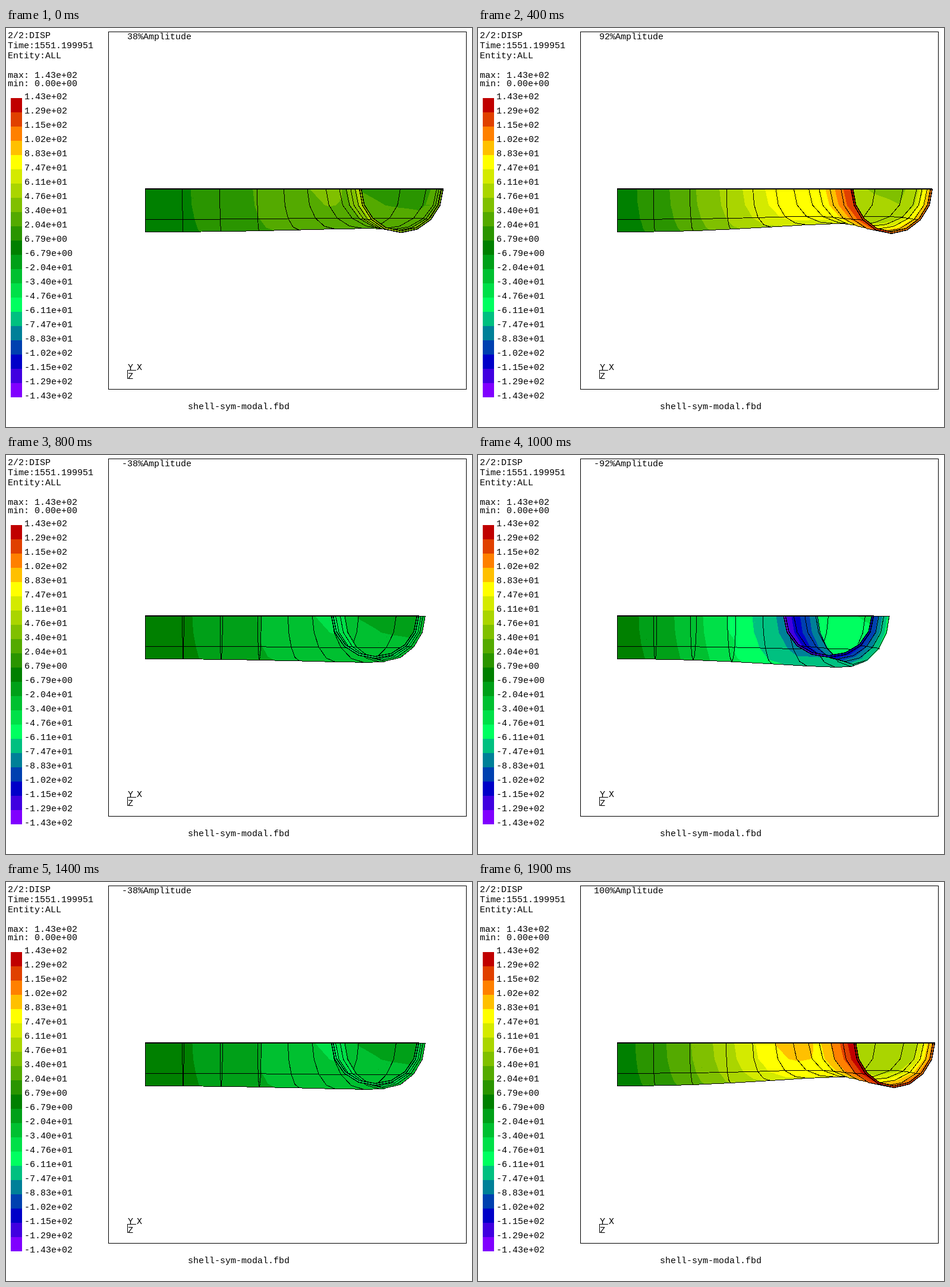
These frames come from a looping animation (784x672 px, 2 s). An HTML page:

```html
<!DOCTYPE html>
<html lang="en">
<head>
<meta charset="utf-8">
<title>Mode shape</title>
<style>
  html, body { margin: 0; width: 100%; height: 100%; overflow: hidden; background: #fff; }
  svg { display: block; width: 784px; height: 672px; }
  text { font: 15px "Liberation Mono", monospace; white-space: pre; }
  .line { fill: none; stroke: #000; }
</style>
</head>
<body>
<svg viewBox="0 0 784 672" shape-rendering="crispEdges">
  <rect width="784" height="672" fill="#fff"/>
  <g id="legend"></g>
  <g id="mesh"></g>
  <rect class="line" x="172.5" y="6.5" width="602" height="602"/>
  <path class="line" d="M219 576.5H204.5V591"/>
  <text x="3" y="17">2/2:DISP</text>
  <text x="3" y="34">Time:1551.199951</text>
  <text x="3" y="51">Entity:ALL</text>
  <text x="3" y="84">max: 1.43e+02</text>
  <text x="3" y="98">min: 0.00e+00</text>
  <text x="205" y="576">Y</text>
  <text x="220" y="576">X</text>
  <text x="205" y="591">Z</text>
  <text x="306" y="642">shell-sym-modal.fbd</text>
  <text id="label" x="312" y="19" text-anchor="end"></text>
</svg>
<script>
const COLORS = ('c00000 e04000 ff8000 ffc000 ffff00 d4ea00 aad500 80c000 54aa00 2a9500 008000 ' +
  '00a018 00c030 00e048 00ff60 00c080 008098 0040b0 0000c8 4000e0 8000ff').split(' ').map(c => '#' + c);
const BAND = 13.588;
const STEP_MS = 100, LOOP_MS = 2000;

// Pipe: straight run, elbow towards the viewer, straight end
const LEFT = 234, TOP = 271, ELBOW = 426, PITCH = 64;
const BEND = 217, RX = 72, RY = 72.5, WALL = 3;
const LAST = 11, SUB = 2, SIDES = 8, HALF = SIDES / 2;

// Mode shape per station at the inner, lower and outer fibre
const MODE = {
  x: {
    inner: [0, -3, -6, -8.5, -9, -11, -13, -8, 3, 23, 43, 61.5],
    lower: [0, 0, 0, -1, -1, 0, 1, 5, 13, 28, 42, 57],
    outer: [0, 3, 5, 7, 7, 7, 9, 15.5, 25, 35, 44, 53.5]
  },
  value: {
    inner: [0, 13.5, 33, 56, 73, 88.5, 90.7, 89.7, 86, 103, 120, 142],
    lower: [0, 10, 28, 48, 63, 72, 71, 70, 75, 90, 106, 124],
    outer: [0, 13, 31, 52, 60, 53, 51, 50, 60, 76, 93, 111]
  },
  drop: [0, -0.5, -2, -5, -9, -13, -15, -14, -10, -5, 0, 3]
};

const mesh = document.getElementById('mesh');
const label = document.getElementById('label');

function sample(list, s) {
  const i = Math.min(Math.floor(s), LAST - 1);
  return list[i] + (list[i + 1] - list[i]) * (s - i);
}

function around(field, s, angle) {
  const inner = sample(field.inner, s), lower = sample(field.lower, s), outer = sample(field.outer, s);
  const mean = (inner + outer) / 2, oval = (mean - lower) / 2;
  return mean - oval + (inner - outer) / 2 * Math.cos(angle) + oval * Math.cos(2 * angle);
}

function node(s, side, amp, inset = 0) {
  const angle = Math.PI * side / SIDES;
  const reach = (RX - inset) * Math.cos(angle);
  const turn = Math.min(Math.max(s - 3, 0), 5) * Math.PI / 10;
  const x = s <= 3 ? LEFT + PITCH * s : ELBOW + (BEND - reach) * Math.sin(turn);
  const y = TOP + (RY - inset) * Math.sin(angle);
  return {
    x: x + amp * around(MODE.x, s, angle),
    y: y + amp * sample(MODE.drop, s) * Math.sin(angle) ** 3,
    v: Math.abs(amp) * around(MODE.value, s, angle) / BAND
  };
}

const ring = (s, amp, inset) =>
  Array.from({ length: SIDES + 1 }, (_, i) => node(s, i, amp, inset));

const pathOf = pts => 'M' + pts.map(p => p.x.toFixed(1) + ' ' + p.y.toFixed(1)).join('L');
const stroke = (pts, width = 1) => `<path class="line" stroke-width="${width}" d="${pathOf(pts)}"/>`;

// Keep the part of a polygon whose value is at least min
function clip(poly, min) {
  const out = [];
  poly.forEach((p, i) => {
    const q = poly[(i + 1) % poly.length];
    if (p.v >= min) out.push(p);
    if ((p.v >= min) !== (q.v >= min)) {
      const k = (min - p.v) / (q.v - p.v);
      out.push({ x: p.x + (q.x - p.x) * k, y: p.y + (q.y - p.y) * k, v: min });
    }
  });
  return out;
}

function shade(poly, sign) {
  const values = poly.map(p => p.v);
  const lo = Math.max(0, Math.round(Math.min(...values)));
  const hi = Math.min(10, Math.round(Math.max(...values)));
  let out = '';
  for (let n = lo; n <= hi; n++) {
    const part = n === lo ? poly : clip(poly, n - 0.5);
    if (part.length > 2) out += `<path fill="${COLORS[10 - sign * n]}" d="${pathOf(part)}Z"/>`;
  }
  return out;
}

function strip(a, b, sign) {
  let out = '';
  for (let i = a.length - 2; i >= 0; i--) {
    out += shade([a[i], b[i], b[i + 1]], sign) + shade([a[i], b[i + 1], a[i + 1]], sign);
  }
  return out;
}

// One half of a pipe segment: filled bands, then its element edges
function panel(rings, sign) {
  let out = '';
  for (let k = 0; k < SUB; k++) out += strip(rings[k], rings[k + 1], sign);
  out += stroke(rings[0]);
  for (let side = 0; side <= HALF; side += 2) out += stroke(rings.map(r => r[side]));
  return out;
}

function drawMesh(amp) {
  const sign = amp < 0 ? -1 : 1;
  let out = '';
  for (let s = 0; s < LAST; s++) {
    const rings = Array.from({ length: SUB + 1 }, (_, k) => ring(s + k / SUB, amp));
    out += panel(rings.map(r => r.slice(HALF)), sign);
    out += panel(rings.map(r => r.slice(0, HALF + 1)), sign);
  }
  const rim = ring(LAST, amp), bore = ring(LAST, amp, WALL);
  out += strip(rim, bore, sign) + stroke(rim, 1.5) + stroke(bore, 1.5);
  return out + stroke([node(0, 0, amp), rim[SIDES]], 2);
}

function drawLegend() {
  const boxes = COLORS.map((c, i) => `<rect x="8" y="${118 + 24 * i}" width="19" height="24" fill="${c}"/>`);
  const texts = Array.from({ length: COLORS.length + 1 }, (_, i) => {
    const value = ((10.5 - i) * BAND).toExponential(2).replace('e+', 'e+0');
    return `<text x="31" y="${120 + 24 * i}">${value}</text>`;
  });
  document.getElementById('legend').innerHTML = boxes.join('') + texts.join('');
}

let shown = -1;
const start = performance.now();

function update(now) {
  const step = Math.floor((Math.max(0, now - start) % LOOP_MS) / STEP_MS);
  if (step !== shown) {
    shown = step;
    const amp = Math.sin((step + 1) * Math.PI / 8);
    mesh.innerHTML = drawMesh(amp);
    label.textContent = (Math.round(amp * 100) || 0) + '%Amplitude';
  }
  requestAnimationFrame(update);
}

drawLegend();
update(start);
</script>
</body>
</html>
```
